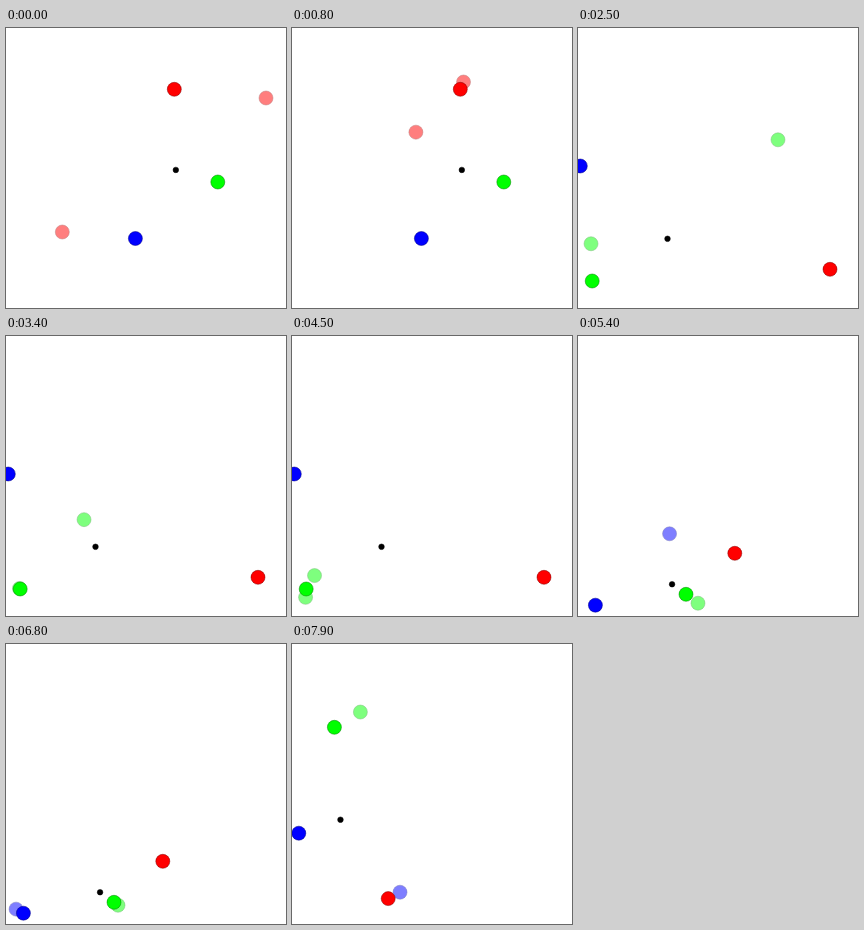
An HTML page for the animation above (8 s loop, 280x280 px).

```html
<!DOCTYPE html>
<html lang="en">
<head>
<meta charset="utf-8">
<title>Agents and landmarks</title>
<style>
  html, body { margin: 0; width: 100%; height: 100%; overflow: hidden; background: #fff; }
  svg { display: block; width: 100vw; height: 100vh; }
  circle { stroke-width: 1; stroke-opacity: .5; }
  .agent { opacity: .5; }
  .red { fill: #f00; stroke: #800000; }
  .green { fill: #0f0; stroke: #008000; }
  .blue { fill: #00f; stroke: #000080; }
  .black { fill: #000; stroke: #000; }
</style>
</head>
<body>
<svg viewBox="0 0 280 280"></svg>
<script>
const TICK = 100, LOOP = 80;

// An agent starts at rest and is pulled to its resting place;
// pace is the strength of the pull along x and y.
const agent = (goal, from, rest, pace) => ({ goal, from, rest, pace });

const episodes = [
  { start: 0,
    marks: { red: [168.3, 61.3], green: [211.8, 154], blue: [129.4, 210.5] },
    agents: [
      agent('red', [260, 70], [163.2, 52.5], [.51, .51]),
      agent('red', [56.3, 204], [163, 57], [.269, .293])
    ] },
  { start: 24,
    marks: { red: [252, 241.3], green: [14.2, 253], blue: [2.3, 138] },
    agents: [
      agent('green', [13, 214], [13.6, 262], [.3, .3]),
      agent('green', [204.2, 110], [13, 261], [.226, .164])
    ] },
  { start: 49,
    marks: { red: [156.8, 217.3], green: [108, 258.3], blue: [17.4, 269.2] },
    agents: [
      agent('blue', [172.4, 131], [7.8, 267], [.33, .33]),
      agent('green', [127.9, 273.1], [111.8, 261.1], [.33, .33])
    ] },
  { start: 74,
    marks: { red: [96.2, 254.6], green: [42.4, 83.3], blue: [6.8, 189.2] },
    agents: [
      agent('green', [84.5, 66], [45, 71], [.28, .28]),
      agent('blue', [177, 267], [8, 190], [.28, .189])
    ] }
];

const svg = document.querySelector('svg');

function makeDots(count, kind) {
  return Array.from({ length: count }, () => {
    const dot = document.createElementNS('http://www.w3.org/2000/svg', 'circle');
    dot.dataset.kind = kind;
    return svg.appendChild(dot);
  });
}

function place(dot, color, [cx, cy], r = 7) {
  const attrs = { cx, cy, r, class: `${dot.dataset.kind} ${color}` };
  for (const key in attrs) dot.setAttribute(key, attrs[key]);
}

// Critically damped pull from rest: 1 at the start, falling to 0.
const damp = u => (1 + u) * Math.exp(-u);

const locate = ({ from, rest, pace }, age) =>
  rest.map((end, k) => end + (from[k] - end) * damp(pace[k] * age));

const agentDots = makeDots(2, 'agent');
const markDots = makeDots(3, 'mark');
const [centreDot] = makeDots(1, 'mark');

function draw(tick) {
  const { start, marks, agents } = episodes.filter(e => e.start <= tick).pop();
  agents.forEach((a, i) => place(agentDots[i], a.goal, locate(a, tick - start)));
  Object.entries(marks).forEach(([color, pos], i) => place(markDots[i], color, pos));
  const centre = [0, 1].map(k => (marks.red[k] + marks.green[k] + marks.blue[k]) / 3);
  place(centreDot, 'black', centre, 2.8);
}

const begin = performance.now();
function frame() {
  draw(Math.floor((performance.now() - begin) / TICK) % LOOP);
  requestAnimationFrame(frame);
}
frame();
</script>
</body>
</html>
```
